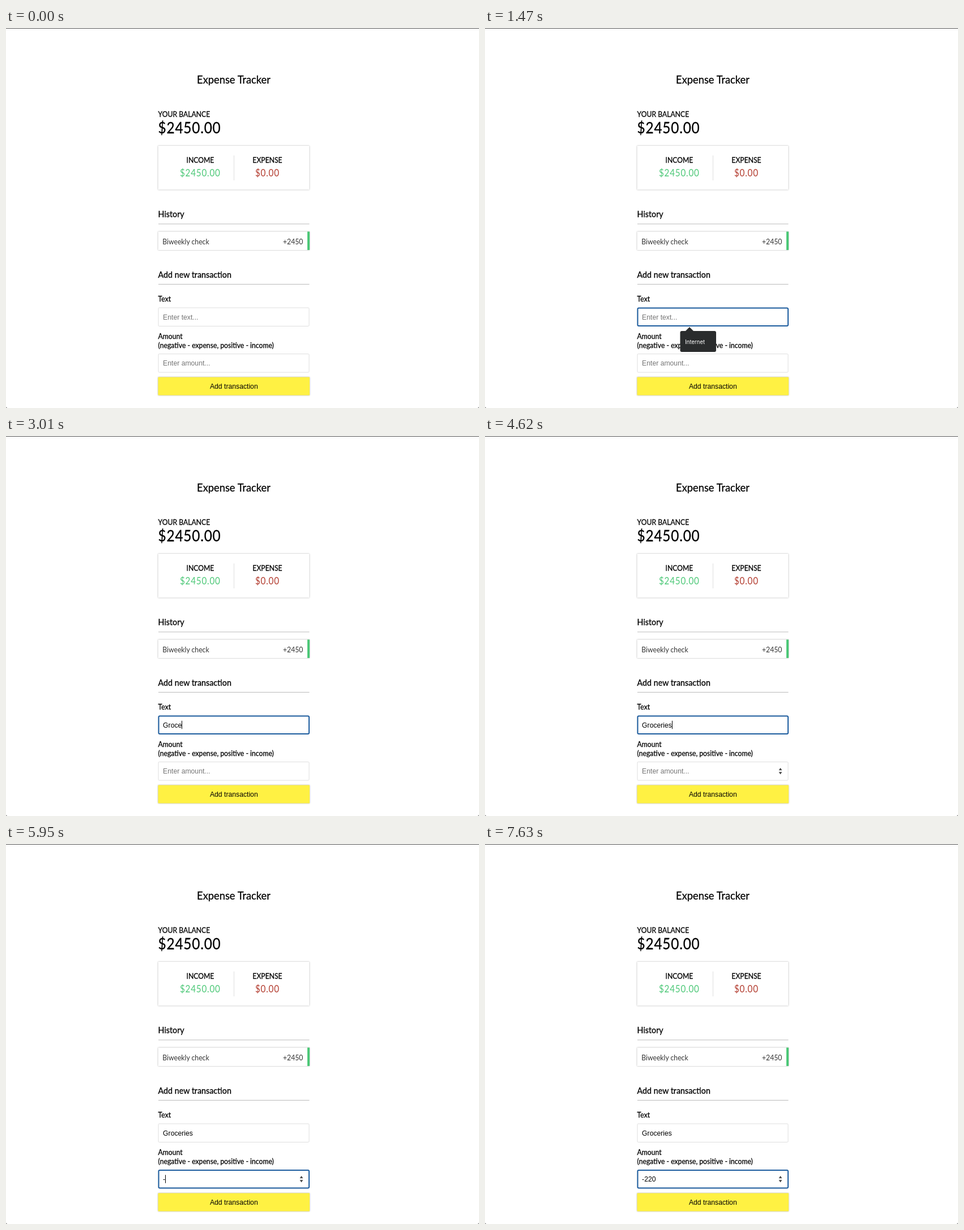
Animation of 835 by 671 pixels, one loop 8000 ms. Source, as an HTML page:

```html
<!DOCTYPE html>
<html lang="en">
<head>
<meta charset="utf-8">
<title>Expense Tracker</title>
<style>
  html, body { margin: 0; width: 100%; height: 100%; overflow: hidden; background: #fff; }
  svg { display: block; }
  text { font-family: Lato, sans-serif; fill: #111; white-space: pre; }
  .head { fill: #000; stroke: #000; stroke-width: .35px; }
  .field { font-family: "Liberation Sans", Arial, sans-serif; fill: #000; }
  .hint { fill: #757575; }
  .money { letter-spacing: 1px; }
  .green { fill: #4cc877; }
  .red { fill: #b23a2d; }
  .dark { fill: #333; }
  .tip { font-family: Inter, sans-serif; fill: #fff; }
  .card { fill: #fff; filter: drop-shadow(0 .8px 1.2px #0000001f) drop-shadow(0 .8px .8px #0000003d); }
  .btn { fill: #fff143; }
  .box { fill: #fff; stroke: #dedede; }
  .ring { fill: none; stroke: #1c5c9e; stroke-width: 2; }
  .rule { stroke: #bbb; }
</style>
</head>
<body>
<svg id="stage" width="835" height="671" viewBox="0 0 835 671">
  <path d="M0 0H835V1H0ZM0 668V671H3Q0 671 0 668ZM835 668V671H832Q835 671 835 668Z" fill="#555"/>
  <rect class="card" x="268.5" y="208" width="267" height="77.5"/>
  <path d="M402.5 225V269" stroke="#dedede"/>
  <path class="rule" d="M269 346H535.5M269 452.5H535.5"/>
  <rect class="card" x="268.5" y="359.5" width="267.5" height="32.5"/>
  <rect class="green" x="532" y="359.5" width="4" height="32.5"/>
  <rect class="box" x="269" y="494" width="266" height="32.5" rx="1.5"/>
  <rect class="box" x="269" y="575.5" width="266" height="32.5" rx="1.5"/>
  <rect class="card btn" x="268.5" y="616.5" width="267.5" height="32"/>
  <rect class="ring" id="ring" x="269.5" width="265.5" height="31.5" rx="2"/>
  <path id="spinner" d="M518.6 590.2L521.5 586L524.4 590.2ZM518.6 593.2L521.5 597.4L524.4 593.2Z" fill="#444"/>
  <g id="labels"></g>
  <rect id="caret" width="1" height="14.5"/>
  <g id="tip">
    <path d="M353.5 535.5L361 528L368.5 535.5Z" fill="#2a2c2d"/>
    <rect x="344.5" y="535" width="63.5" height="37" rx="3" fill="#2a2c2d"/>
  </g>
</svg>
<script>
const $ = id => document.getElementById(id);
const SX = .763, SY = .82; // the whole page is shown at this scale
const LOOP = 8000, FIELD_X = 277.1;

function label(x, y, size, str, cls = '', anchor = 'start', parent = $('labels')) {
  const el = document.createElementNS('http://www.w3.org/2000/svg', 'text');
  el.setAttribute('transform', `translate(${x} ${y}) scale(${SX} ${SY})`);
  el.setAttribute('font-size', size);
  el.setAttribute('text-anchor', anchor);
  el.setAttribute('class', cls);
  el.textContent = str;
  return parent.appendChild(el);
}

label(402, 98.3, 24, 'Expense Tracker', 'head', 'middle');
label(268.6, 156.8, 16, 'YOUR BALANCE', 'head');
label(268.6, 185.8, 32, '$2450.00', 'head money');
label(343, 238.2, 16, 'INCOME', 'head', 'middle');
label(461.5, 238.2, 16, 'EXPENSE', 'head', 'middle');
label(307, 261.6, 20, '$2450.00', 'money green');
label(440, 261.6, 20, '$0.00', 'money red');
label(268.6, 334, 18.72, 'History', 'head');
label(276.3, 381.5, 16, 'Biweekly check', 'dark');
label(524.4, 381.5, 16, '+2450', 'dark', 'end');
label(268.6, 440.6, 18.72, 'Add new transaction', 'head');
label(268.6, 483, 16, 'Text', 'head');
label(268.6, 549, 16, 'Amount', 'head');
label(268.6, 564.6, 16, '(negative - expense, positive - income)', 'head');
label(402.3, 637, 16, 'Add transaction', 'field', 'middle');
label(353.3, 557.8, 12.5, 'Internet', 'tip', 'start', $('tip'));

const fields = [
  { el: label(FIELD_X, 514.7, 16, '', 'field'), hint: 'Enter text...', value: 'Groceries',
    keys: [1680, 1960, 2800, 2870, 3010, 3150, 3220, 3360, 3570], top: 494.5 },
  { el: label(FIELD_X, 596.2, 16, '', 'field'), hint: 'Enter amount...', value: '-220',
    keys: [5530, 6510, 6860, 7140], top: 576 }
];
const caretOn = [[910, 1470], [1680, 2520], [2800, 4130], [4620, 5320], [5530, 6020], [6510, 7630]];

const show = (id, on) => $(id).setAttribute('visibility', on ? 'visible' : 'hidden');
const within = (t, [from, to]) => t >= from && t < to;

function draw(t) {
  for (const f of fields) {
    f.typed = f.value.slice(0, f.keys.filter(k => k <= t).length);
    f.el.textContent = f.typed || f.hint;
    f.el.classList.toggle('hint', !f.typed);
  }
  const active = fields[t < 4830 ? 0 : 1];
  const width = active.typed ? active.el.getComputedTextLength() * SX : 0;
  $('caret').setAttribute('x', Math.round(FIELD_X + width));
  $('caret').setAttribute('y', active.top + 8.3);
  $('ring').setAttribute('y', active.top);
  show('caret', caretOn.some(span => within(t, span)));
  show('ring', t >= 910);
  show('tip', within(t, [980, 1680]));
  show('spinner', t >= 4200);
}

const start = performance.now();
function tick() {
  draw((performance.now() - start) % LOOP);
  requestAnimationFrame(tick);
}
tick();
</script>
</body>
</html>
```
